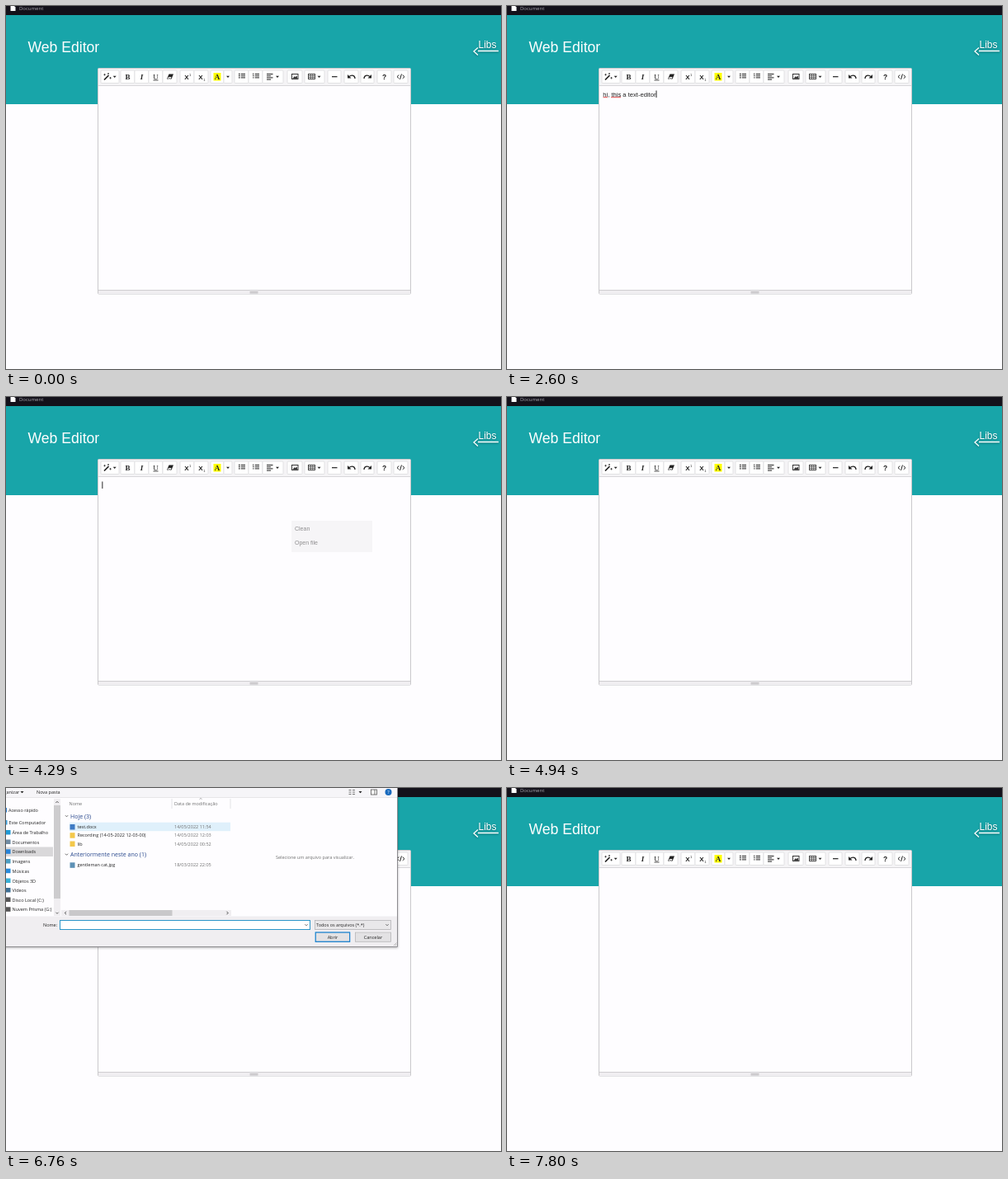
Write an HTML page that moves like this. It is 600 by 440 pixels and loops after 8 s.

```html
<!DOCTYPE html>
<html lang="en">
<head>
<meta charset="utf-8">
<title>Web editor</title>
<style>
  html, body { margin: 0; width: 100%; height: 100%; overflow: hidden; background: #fefdff; }
  svg { display: block; width: 600px; height: 440px; }
  text { font-family: "Liberation Sans", Arial, sans-serif; white-space: pre; }
  #dialog text { font-family: "Open Sans", "Noto Sans", sans-serif; font-size: 5.5px; fill: #222; }
  #dialog .group { font-size: 7px; fill: #27478c; }
  #dialog .dim { fill: #707070; }
  .btn { fill: #fff; stroke: #dcdcdf; stroke-width: .8; }
  .line { fill: none; stroke: #222; stroke-width: 1; }
  .bold { font: bold 9px "Liberation Serif", serif; }
</style>
</head>
<body>
<svg viewBox="0 0 600 440" xmlns="http://www.w3.org/2000/svg">
  <rect width="600" height="440" fill="#fefdff"/>
  <rect width="600" height="119" fill="#18a5a9"/>
  <rect width="600" height="11" fill="#13111a"/>
  <path d="M5.5 -1H9L11.500 1.500V6H5.500Z" fill="#fff"/>
  <text x="16" y="5" font-size="6" fill="#aaa8b0" style="font-family:'Open Sans',sans-serif">Document</text>
  <text x="26.500" y="56" font-size="17.600" fill="#fff">Web Editor</text>
  <g style="filter:drop-shadow(0 1px 1px #0005)">
    <text x="572.500" y="50.500" font-size="12" fill="#fff">Libs</text>
    <path d="M572 50.500L567 55L572 59.500M572 54.500H597" fill="none" stroke="#fff" stroke-width="1.300"/>
  </g>

  <rect x="111.500" y="75.500" width="379" height="273.500" rx="1" fill="#fefdff" stroke="#cac9cc"/>
  <rect x="112" y="76" width="378" height="20" fill="#f5f4f6"/>
  <path d="M112 96.500H490" stroke="#d8d7da"/>
  <g id="toolbar"></g>
  <rect x="112" y="344" width="378" height="5" fill="#f0eef1"/>
  <path d="M112 344.500H490" stroke="#cfced1"/>
  <path d="M295.500 346.500H305.500M295.500 348H305.500" stroke="#b0afb2" stroke-width=".8"/>

  <text id="typed" x="116.300" y="109.500" font-size="7.600" fill="#222"></text>
  <g id="marks" fill="none" stroke="#e33b3b" stroke-width=".9">
    <path d="M116.500 110.700H122"/><path d="M126 110.700H138"/><path d="M146.500 110.700H158.500"/>
  </g>
  <rect id="caret" y="102.500" width=".9" height="8.500" fill="#111"/>

  <g id="menu">
    <rect width="98" height="38" fill="#f0eef1"/>
    <rect id="choice" width="98" height="18" fill="#757476"/>
    <text x="4" y="11.500" font-size="7">Clean</text>
    <text x="4" y="29" font-size="7">Open file</text>
  </g>

  <g id="dialog"></g>
</svg>

<script>
const $ = id => document.getElementById(id);
const rect = (x, y, w, h, fill, more = '') =>
  `<rect x="${x}" y="${y}" width="${w}" height="${h}" fill="${fill}" ${more}/>`;
const text = (x, y, s, more = '') => `<text x="${x}" y="${y}" ${more}>${s}</text>`;
const line = (d, stroke = '#222', width = 1) =>
  `<path d="${d}" fill="none" stroke="${stroke}" stroke-width="${width}"/>`;
const down = (x, y) => `<path d="M${x - 2} ${y - 1}h4l-2 2.200z" fill="#222"/>`;
const glyph = (x, s, more = '') => text(x, 88.700, s, `class="bold" text-anchor="middle" fill="#222" ${more}`);
const sans = size => `style="font:bold ${size}px 'Liberation Sans',sans-serif"`;
const bars = (x, widths) => widths.map((w, i) => line(`M${x} ${82.500 + i * 2.200}h${w}`)).join('');

function buildToolbar() {
  const buttons = [[115, 22], [139, 17], [156, 17], [173, 17], [190, 17], [211, 17], [228, 17],
    [248, 16], [264, 10], [277, 17], [294, 17], [311, 25], [341, 18], [362, 24], [390, 16],
    [410, 17], [430, 16], [450, 17], [470, 17]];
  const undo = line('M416 85.500C419 83 423 84 423 88', '#222', 1.300) +
    '<path d="M414 83v4.500h4.500z" fill="#222"/>';
  $('toolbar').innerHTML =
    buttons.map(([x, w]) => `<rect class="btn" x="${x}" y="78" width="${w}" height="15.500" rx="1"/>`).join('') +
    line('M119 89.500L124.500 84', '#222', 1.700) +
    line('M119.500 82v2.500M118.300 83.200h2.500M124 81v2M123 82h2M126.500 86v2.500M125.300 87.200h2.500', '#222', .7) +
    down(131.700, 85.700) +
    glyph(147.500, 'B') + glyph(164.500, 'I', 'font-style="italic" style="font-style:italic"') +
    glyph(181.500, 'U', 'style="font-weight:normal"') + line('M178.500 90h6', '#222', .8) +
    '<path d="M197.500 82.500h5.500l-2.500 6h-5.500z" fill="#222"/>' + line('M197 86.500h3l-1 1.500h-2.500z', '#fff', .9) +
    glyph(218.800, 'X', sans(8)) + text(222, 85, '1', 'font-size="4" fill="#222"') +
    glyph(235.800, 'X', sans(8)) + text(239.300, 90.500, '1', 'font-size="4" fill="#222"') +
    rect(251.500, 81, 9, 9.500, '#ffff00') + glyph(256, 'A') + down(269, 85.700) +
    [282, 299].map(x => bars(x + 2.700, [5.300, 5.300, 5.300].map(w => w)) ).join('') +
    line('M282 82.500h1.500M282 84.700h1.500M282 86.900h1.500', '#222', 1.300) +
    line('M299.700 81.500v2M299 84.700h1.500M299 86.900h1.500', '#222', .9) +
    bars(316, [7.500, 5, 7.500, 5]) + down(329, 85.700) +
    rect(346.500, 82.500, 7.500, 6, 'none', 'stroke="#222" stroke-width=".9"') +
    '<path d="M347.500 87.700l2-2.500 1.300 1 1.500-1.700 1 3.200z" fill="#222"/>' +
    rect(366.500, 82.500, 8, 6, 'none', 'stroke="#333" stroke-width=".9"') +
    line('M366.500 84.500h8M366.500 86.500h8M369.200 82.500v6M371.900 82.500v6', '#333', .7) + down(379.500, 85.700) +
    line('M395 85.700h6.500', '#222', 1.200) +
    undo + `<g transform="translate(857 0) scale(-1 1)">${undo}</g>` +
    glyph(458.500, '?', sans(8.500)) +
    line('M476.300 83.500l-2.300 2.200 2.300 2.200M480.700 83.500l2.300 2.200-2.300 2.200M479.400 82.500l-1.800 6.400');
}

function buildDialog() {
  const stage = (n, ...parts) => `<g data-stage="${n}">${parts.join('')}</g>`;
  const places = [['Acesso rápido', 3, 29, '#2f7fd0'], ['Este Computador', 3.500, 44, '#3aa0dd'],
    ['Área de Trabalho', 7.500, 56, '#1f9ad6'], ['Documentos', 7.500, 67.500, '#6f8ba3'],
    ['Downloads', 7.500, 79.300, '#2583d8'], ['Imagens', 7.500, 91, '#4b9fc4'],
    ['Músicas', 7.500, 102.700, '#268bdc'], ['Objetos 3D', 7.500, 114.500, '#36b0d6'],
    ['Vídeos', 7.500, 126, '#3d6f94'], ['Disco Local (C:)', 7.500, 137.500, '#555'],
    ['Nuvem Prisma (G:)', 7.500, 149.300, '#555']];
  const files = [['test.docx', '14/05/2022 11:54', 49, '#3e7bc4'],
    ['Recording (14-05-2022 12-03-00)', '14/05/2022 12:03', 59.200, '#f3c84b'],
    ['lib', '14/05/2022 00:52', 69.500, '#f3c84b'],
    ['gentleman cat.jpg', '18/03/2022 22:05', 95.300, '#5d91b5']];
  const tick = (x, y) => line(`M${x - 1.600} ${y - .8}l1.600 1.600 1.600-1.600`, '#444', .8);

  $('dialog').innerHTML =
    rect(-5, 0, 480, 193, '#fefdff', 'style="filter:drop-shadow(0 1px 1.500px #0004)"') +
    rect(0, 155.500, 474.500, 37, '#f0eef1') +
    rect(202, 148, 62, 7, '#f0eef1') + rect(76.500, 148, 125, 7, '#c9c8ca') +
    rect(65, 160, 303.500, 11.500, '#fff') + rect(374, 160, 92.500, 11.500, '#fff') +
    rect(374, 174, 44, 13, '#fff') + rect(423, 174, 43.500, 13, '#fff') +
    `<g id="blank">${rect(45, 162, 18, 7, '#fff') + rect(466.500, 184, 8, 8, '#fff')}</g>` +
    stage(2,
      rect(0, 0, 474, 11, '#f6f5f8'), line('M0 11.500H474', '#e6e5e8'),
      text(-9, 7, 'Organizar'), down(19.500, 5), text(37, 7, 'Nova pasta'),
      line('M415.500 2.500h3M415.500 5h3M415.500 7.500h3M420 2.500h3M420 5h3M420 7.500h3', '#777', 1), down(429.500, 5),
      rect(442.500, 2, 7, 6, '#fff', 'stroke="#555" stroke-width=".8"'), line('M447 2v6', '#555', .8),
      '<circle cx="463.500" cy="5" r="4" fill="#1769bd"/>',
      text(463.500, 7, '?', 'text-anchor="middle" style="fill:#fff"'),
      rect(58, 13, 8, 142, '#f0eef1'), rect(58, 21, 8, 113, '#cdccce'),
      line('M60.300 18l1.700-1.700 1.700 1.700', '#444', .9), tick(62, 151.500),
      rect(67, 148, 206, 7, '#f0eef1'), rect(76.500, 148, 125, 7, '#c9c8ca'),
      line('M73 149.800l-1.700 1.700 1.700 1.700M267.500 149.800l1.700 1.700-1.700 1.700', '#333', .9),
      rect(65.500, 160.500, 303, 11, '#fff', 'stroke="#2c96c9"'), tick(364, 166),
      rect(374.500, 160.500, 92, 11, '#e9e8ea', 'stroke="#b4b3b6" stroke-width=".8"'), tick(462, 166),
      rect(375.200, 175, 41.500, 11.300, '#e3e2e4', 'id="open" stroke="#1b7fcb" stroke-width="1.300"'),
      rect(423.500, 175, 43, 11.300, '#e3e2e4', 'stroke="#b4b3b6" stroke-width=".8"'),
      line('M470 191l3.500-3.500M472 191l1.500-1.500', '#aaa', .8)) +
    stage(3,
      rect(0, 71.500, 57, 11.500, '#d9d8da'),
      ...places.map(([name, x, y, color]) => rect(x - 9, y - 5, 7, 5.500, color) + text(x, y, name)),
      text(45, 168, 'Nome:'), text(376, 168, 'Todos os arquivos (*.*)'),
      text(396, 182.700, 'Abrir', 'text-anchor="middle"'), text(445, 182.700, 'Cancelar', 'text-anchor="middle"'),
      text(76.500, 21, 'Nome', 'class="dim"'), text(204, 21, 'Data de modificação', 'class="dim"'),
      line('M201 13v12M272 13v12', '#dddce0', .8), line('M234.500 13.700l1.500-1.300 1.500 1.300', '#888', .7)) +
    stage(4,
      rect(77, 0, 195, 10.500, '#dff0fb', 'id="row"'),
      text(78, 36.500, 'Hoje (3)', 'class="group"'),
      text(78, 83, 'Anteriormente neste ano (1)', 'class="group"'),
      tick(73.500, 34), tick(73.500, 80.500),
      ...files.map(([name, date, y, color]) =>
        rect(77.500, y - 5, 6, 6.500, color) + text(86.500, y, name) + text(204, y, date, 'class="dim"')),
      text(374.500, 86, 'Selecione um arquivo para visualizar.', 'class="dim" text-anchor="middle"'),
      text(68, 168, '', 'id="fileName"')) +
    line('M474.500 0V192.500H0', '#8d8c90');
}

const LOOP = 8000;
const phrase = 'hi, this a text-editor';
const typing = [[0, 0], [520, 1], [650, 2], [910, 3], [1040, 6], [1300, 7], [1430, 8], [1560, 9],
  [1690, 10], [1820, 11], [1950, 13], [2080, 15], [2210, 16], [2340, 18], [2470, 20], [2600, 22], [3900, 0]];
const caretOn = [[0, 0], [130, 1], [2990, 0], [4290, 1], [4810, 0]];
// [start, x, y, opacity, highlighted item]
const menuSteps = [[0, 0, 0, 0, -1], [3380, 189, 143, .5, -1], [3510, 189, 143, 1, -1], [3640, 189, 143, 1, 0],
  [3900, 189, 143, .45, 0], [4030, 0, 0, 0, -1], [4290, 346, 150, .5, -1], [4420, 346, 150, 1, 0],
  [4550, 346, 150, 1, 1], [4810, 346, 150, .45, 1], [4940, 0, 0, 0, -1]];
const dialogStage = [[0, 0], [5850, 1], [5980, 2], [6110, 3], [6240, 4], [7540, 0]];
const rowY = [[0, -20], [6370, 62.500], [6500, 52], [6760, 41.700]];

const at = (steps, t) => steps.findLast(step => step[0] <= t);
const show = (el, on) => { el.style.display = on ? '' : 'none'; };

buildToolbar();
buildDialog();
const marks = [...$('marks').children];
const stages = [...document.querySelectorAll('[data-stage]')];
const menuLabels = $('menu').querySelectorAll('text');

function render(t) {
  const count = at(typing, t)[1];
  $('typed').textContent = phrase.slice(0, count);
  [t >= 1300, t >= 1560, t >= 3380].forEach((on, i) => show(marks[i], on && count));
  show($('caret'), at(caretOn, t)[1]);
  $('caret').setAttribute('x', 116.400 + (count ? $('typed').getComputedTextLength() : 0));

  const [, x, y, opacity, item] = at(menuSteps, t);
  show($('menu'), opacity);
  $('menu').setAttribute('transform', `translate(${x} ${y})`);
  $('menu').setAttribute('opacity', opacity);
  show($('choice'), item >= 0);
  $('choice').setAttribute('y', item > 0 ? 18 : 0);
  $('choice').setAttribute('height', item > 0 ? 20 : 18);
  menuLabels.forEach((label, i) => label.setAttribute('fill', i === item ? '#e6e5e7' : '#222'));

  const stage = at(dialogStage, t)[1];
  show($('dialog'), stage);
  $('dialog').setAttribute('opacity', t >= 7410 ? .5 : 1);
  stages.forEach(el => show(el, stage >= el.dataset.stage));
  show($('blank'), stage === 1);
  $('row').setAttribute('y', at(rowY, t)[1]);
  $('row').setAttribute('fill', t >= 7020 ? '#cce6fa' : '#dff0fb');
  show($('row'), t >= 6370);
  $('fileName').textContent = t >= 7020 ? 'test.docx' : '';
  $('open').setAttribute('fill', t >= 7280 ? '#dcecf8' : '#e3e2e4');
}

const start = performance.now();
function tick() {
  render((performance.now() - start) % LOOP);
  requestAnimationFrame(tick);
}
tick();
</script>
</body>
</html>
```
